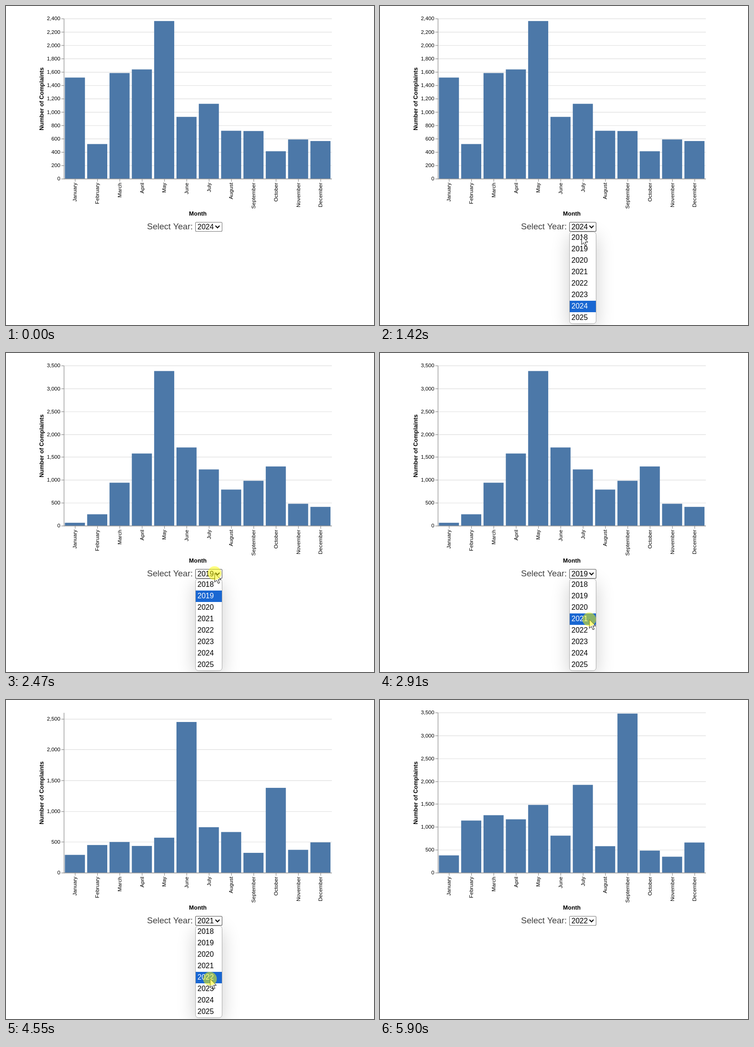
An HTML page with a canvas for the animation above (6110 ms loop, 803 px wide and 697 px high).

```html
<!DOCTYPE html>
<html lang="en">
<head>
<meta charset="utf-8">
<title>Complaints by month</title>
<style>
  html, body { margin: 0; width: 100%; height: 100%; overflow: hidden; background: #fff; }
  canvas { display: block; }
</style>
</head>
<body>
<canvas id="stage" width="803" height="697"></canvas>
<script>
const ctx = document.getElementById('stage').getContext('2d');
const LOOP = 6110, BLUR = 5900;
const FONT = '"Liberation Sans", Arial, sans-serif';
const MONTHS = ['January', 'February', 'March', 'April', 'May', 'June', 'July',
  'August', 'September', 'October', 'November', 'December'];
// Complaints per month
const DATA = {
  2024: [1515, 519, 1583, 1637, 2362, 926, 1122, 718, 714, 411, 588, 564],
  2019: [64, 249, 939, 1577, 3379, 1709, 1229, 789, 981, 1294, 479, 411],
  2021: [289, 449, 498, 434, 568, 2446, 738, 660, 322, 1377, 371, 492],
  2022: [378, 1139, 1256, 1166, 1481, 809, 1919, 579, 3476, 482, 349, 659]
};

// Menu use: time it opens, time a year is taken
const PICKS = [
  { open: 1050, done: 1800, year: 2019 },
  { open: 2470, done: 3060, year: 2021 },
  { open: 3870, done: 4670, year: 2022 }
];
// Pointer moves: start time, end time, x, y
const ENTER = 70, START = [738, 683];
const MOVES = [
  [180, 900, 442, 484], [1300, 1540, 437, 519],
  [1940, 2120, 455, 481], [2520, 2880, 456.5, 582],
  [3200, 3610, 462.5, 481], [3900, 4400, 445, 609],
  [4700, 5140, 541, 562], [5140, 5550, 803, 702]
];
const FIRST_YEAR = 2018, YEARS = 8, ROW = 25, MENU_TOP = 494;

function pointerAt(t) {
  let [x, y] = START;
  for (const [a, b, toX, toY] of MOVES) {
    const u = Math.min(1, Math.max(0, (t - a) / (b - a))), e = u * u * (3 - 2 * u);
    x += (toX - x) * e;
    y += (toY - y) * e;
  }
  return [x, y];
}

function text(str, x, y, size, color = '#000', align = 'left', weight = '') {
  ctx.font = `${weight} ${size}px ${FONT}`;
  ctx.textAlign = align;
  ctx.fillStyle = color;
  ctx.fillText(str, x, y);
}

function upright(str, x, y, ...style) {
  ctx.save();
  ctx.translate(x, y);
  ctx.rotate(-Math.PI / 2);
  text(str, 0, 0, ...style);
  ctx.restore();
}

function stroke(color, width, ...points) {
  ctx.strokeStyle = color;
  ctx.lineWidth = width;
  ctx.beginPath();
  points.forEach(p => ctx.lineTo(...p));
  ctx.stroke();
}

function box(x, y, w, h, r) {
  ctx.beginPath();
  ctx.roundRect(x, y, w, h, r);
}

const niceStep = v => v > 2500 ? 500 : 200;

// Plot of W x H units, enlarged by 7/6
function chart(bars) {
  const W = 501, H = 300, step = W / 12;
  const top = Math.max(...bars), nice = niceStep(top);
  const max = Math.ceil(top / nice) * nice, tick = niceStep(max);
  const h = v => v / max * H;
  const rule = (color, ...points) => stroke(color, 1, ...points);
  ctx.save();
  ctx.translate(126, 27.3);
  ctx.scale(7 / 6, 7 / 6);
  for (let v = 0; v <= max; v += tick) {
    const y = Math.round(H - h(v)) + 0.5;
    rule('#ddd', [0.5, y], [W + 0.5, y]);
    rule('#888', [-4.5, y], [0.5, y]);
    text(v.toLocaleString('en-US'), -6.5, y + 3, 10, '#000', 'right');
  }
  ctx.fillStyle = '#4c78a8';
  bars.forEach((v, i) => ctx.fillRect(step * (i + 0.05), H - h(v), step * 0.9, h(v)));
  MONTHS.forEach((name, i) => {
    const x = step * (i + 0.5) + 0.5;
    rule('#888', [x, H + 0.5], [x, H + 5.5]);
    upright(name, x + 3, H + 7.5, 10, '#000', 'right');
  });
  rule('#888', [0.5, 0.5], [0.5, H + 0.5], [W + 0.5, H + 0.5]);
  text('Month', W / 2 + 0.3, H + 69.5, 11, '#000', 'center', 'bold');
  upright('Number of Complaints', -37.3, H / 2 + 0.5, 11, '#000', 'center', 'bold');
  ctx.restore();
}

function select(year, open, focus) {
  text('Select Year:', 307.7, 488, 18.67, '#404040');
  box(413.5, 472.5, 58, 20, focus ? 3.5 : 2);
  ctx.strokeStyle = focus ? '#101010' : open ? '#555' : '#767676';
  ctx.lineWidth = focus ? 2.3 : 1.1;
  ctx.stroke();
  text(year, 417.8, 488, 16);
  stroke('#000', 2, [457, 480], [461.5, 484.7], [466, 480]);
}

function menu(year, y) {
  ctx.save();
  ctx.shadowColor = 'rgba(0,0,0,.2)';
  ctx.shadowBlur = 40;
  ctx.shadowOffsetY = 10;
  ctx.fillStyle = '#fff';
  box(413.5, MENU_TOP - 0.5, 58, 200.5, 6);
  ctx.fill();
  ctx.restore();
  // The chosen year stays lit until the pointer is well inside the list
  const lit = y > MENU_TOP + 9 ? FIRST_YEAR + Math.floor((y - MENU_TOP) / ROW) : year;
  for (let i = 0; i < YEARS; i++) {
    const rowY = MENU_TOP + ROW * i, on = FIRST_YEAR + i === lit;
    if (on) {
      ctx.fillStyle = '#1967d2';
      ctx.fillRect(414, rowY, 57, ROW);
    }
    text(FIRST_YEAR + i, 417.8, rowY + 17, 16, on ? '#fff' : '#000');
  }
  box(413.5, MENU_TOP - 0.5, 58, 200.5, 6);
  ctx.strokeStyle = '#aaa';
  ctx.lineWidth = 1;
  ctx.stroke();
}

function pointer(x, y, pressed) {
  ctx.save();
  ctx.translate(x, y);
  const arrow = new Path2D('M.5 .5V19.5L4.8 15.6L8 22.6L11 21.2L8 14.3H14Z');
  ctx.fillStyle = '#fff';
  ctx.fill(arrow);
  ctx.strokeStyle = '#000';
  ctx.lineWidth = 1;
  ctx.stroke(arrow);
  if (pressed) {
    ctx.fillStyle = 'rgba(255,255,0,.5)';
    ctx.beginPath();
    ctx.arc(0, 0, 15, 0, 7);
    ctx.fill();
  }
  ctx.restore();
}

function draw(now) {
  const t = now % LOOP;
  const year = PICKS.reduce((y, p) => t >= p.done ? p.year : y, 2024);
  const open = PICKS.some(p => t >= p.open && t < p.done);
  const pressed = PICKS.some(p => Math.abs(t - p.open) < 70 || t >= p.done - 150 && t < p.done);
  const focus = !open && t >= PICKS[0].done && t < BLUR;
  const [x, y] = pointerAt(t);
  ctx.fillStyle = '#fff';
  ctx.fillRect(0, 0, 803, 697);
  chart(DATA[year]);
  select(year, open, focus);
  if (open) menu(year, y);
  if (t >= ENTER) pointer(x, y, pressed);
  requestAnimationFrame(draw);
}
draw(0);
</script>
</body>
</html>
```
